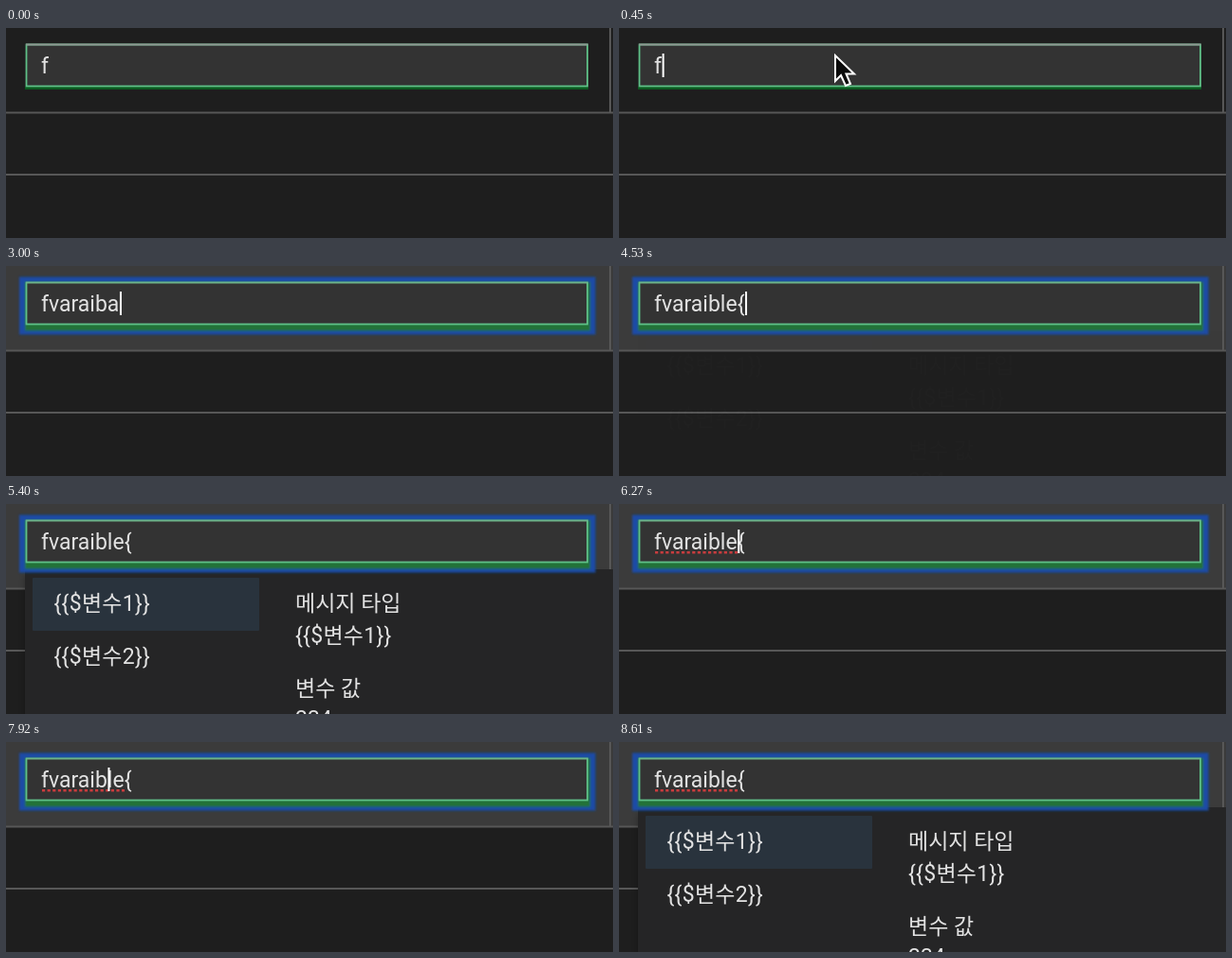
These frames come from a looping animation (640 by 222 pixels, 8.67 s). An HTML page:

```html
<!DOCTYPE html>
<html lang="ko">
<meta charset="utf-8">
<style>
  html, body { margin: 0; width: 100%; height: 100%; overflow: hidden; background: #1e1e1e; }
  svg { display: block; width: 640px; height: 222px; }
  text { font: 23px Roboto, "Noto Sans CJK KR", "Noto Sans CJK", sans-serif; fill: #e2e2e2; white-space: pre; }
  .token { letter-spacing: .3px; }
</style>
<svg viewBox="0 0 640 222">
  <defs>
    <filter id="soft" x="-10%" width="120%"><feGaussianBlur stdDeviation="3"/></filter>
    <filter id="smooth"><feGaussianBlur stdDeviation=".9"/></filter>
  </defs>
  <rect width="640" height="222" fill="#1e1e1e"/>
  <rect id="row" width="640" height="89" fill="#3b3b3b"/>
  <path d="M0 89.5H640M0 155H640M637 0V89" stroke="#575757" stroke-width="2"/>

  <g id="popup">
    <rect x="20" y="76" width="640" height="170" fill="#000" opacity=".3" filter="url(#soft)"/>
    <rect x="20" y="69" width="620" height="153" fill="#252526"/>
    <rect x="28" y="78" width="239" height="56" rx="1" fill="#29333d"/>
    <text class="token" x="50.5" y="113">{{$변수1}}</text>
    <text class="token" x="50.5" y="169">{{$변수2}}</text>
    <text x="305" y="112.6">메시지 타입</text>
    <text class="token" x="305" y="147">{{$변수1}}</text>
    <text x="305" y="202.6">변수 값</text>
    <text x="305" y="234.5">234</text>
  </g>

  <path d="M20 63.5H614" stroke="#0b5a20" stroke-width="3"/>
  <g id="ring" filter="url(#smooth)">
    <rect x="14" y="11.5" width="607.5" height="61" fill="#1c4ba6"/>
    <path d="M20 17H616V68.5H20Z" fill="#207238"/>
  </g>
  <rect x="21.5" y="17.5" width="591.5" height="44" fill="#333" stroke="#5fc088" stroke-width="1.8"/>
  <path id="top" d="M21 17.5H613.5" stroke="#8e9993" stroke-width="2"/>

  <path id="typo" d="M38 51.3H125" stroke="#c93c3e" stroke-width="2.4" stroke-dasharray="3.2 2.4"/>
  <text id="word" x="37" y="47.5"></text>
  <rect id="caret" y="27" width="2" height="25" fill="#fff"/>

  <path id="arrow" d="M0 0V27L6 21L11 32L16 30L11.5 19.5H20Z" fill="#0a0a0a" stroke="#fff" stroke-width="2"/>
  <g id="hand" stroke="#111" stroke-width="1.3">
    <path d="M5 2Q7 0 9 2L12 10Q13 8 15 10Q17 8 19 10Q22 8 23 11Q26 11 26 14L25 21Q25 24 23 25V28H12L11 25Q6 20 2 16Q1 13 4 13L8 15Z" fill="#fff"/>
    <path d="M13.5 16V22M17 16V22M20.5 16V22"/>
  </g>
</svg>
<script>
const LOOP = 8670;
const $ = id => document.getElementById(id);
const clamp = x => Math.max(0, Math.min(1, x));
const ramp = (t, from, to) => clamp((t - from) / (to - from));
const ease = x => x * x * (3 - 2 * x);
const mix = (a, b, k) => a + (b - a) * k;

// Each key press: [time, text, caret index]
const keys = [[400, "f", 1]];
const type = (time, text, at = text.length) => keys.push([time, text, at]);
type(1410, "fv");
type(1620, "fva");
type(1830, "fvar");
type(2040, "fvara");
type(2280, "fvarai");
type(2490, "fvaraib");
type(2700, "fvaraiba");
type(3600, "fvaraib");
type(3810, "fvaraibl");
type(4080, "fvaraible");
const full = "fvaraible{";
type(4500, full);
type(5880, full, 9);
type(6750, full, 8);
for (let i = 7; i >= 1; i--) type(7050 + (7 - i) * 60, full, i);
for (let i = 2; i <= 10; i++) type(7590 + (i - 2) * 60, full, i);

const show = (id, alpha) => $(id).setAttribute("opacity", alpha);
const move = (id, x, y) => $(id).setAttribute("transform", `translate(${x} ${y})`);

function draw(t) {
  const focus = ramp(t, 600, 840);
  show("row", focus);
  show("ring", focus);
  show("top", 1 - 0.7 * focus);

  const key = keys.filter(k => k[0] <= t).pop();
  const [time, text, at] = key || [0, "f", 1];
  const word = $("word");
  word.textContent = text;
  $("caret").setAttribute("x", 37.6 + word.getSubStringLength(0, at));
  show("caret", key && (t - time) % 1000 < 500 ? 1 : 0);
  show("typo", t >= 6000 ? 1 : 0);
  show("popup", t < 7000
    ? ramp(t, 4530, 4680) - ramp(t, 5910, 6060)
    : ramp(t, 8080, 8230));

  // Pointer rises into the field, then becomes a hand on focus
  const rise = ease(ramp(t, 30, 430));
  move("arrow", mix(302, 228, rise), mix(208, 29, rise) + 14 * ramp(t, 480, 600));
  show("arrow", t >= 30 && t < 600 ? 1 : 0);
  move("hand", 218, 43);
  show("hand", t >= 600 && t < 1410 ? 1 : 0);
}

const start = performance.now();
function frame() {
  draw((performance.now() - start) % LOOP);
  requestAnimationFrame(frame);
}
frame();
</script>
</html>
```
